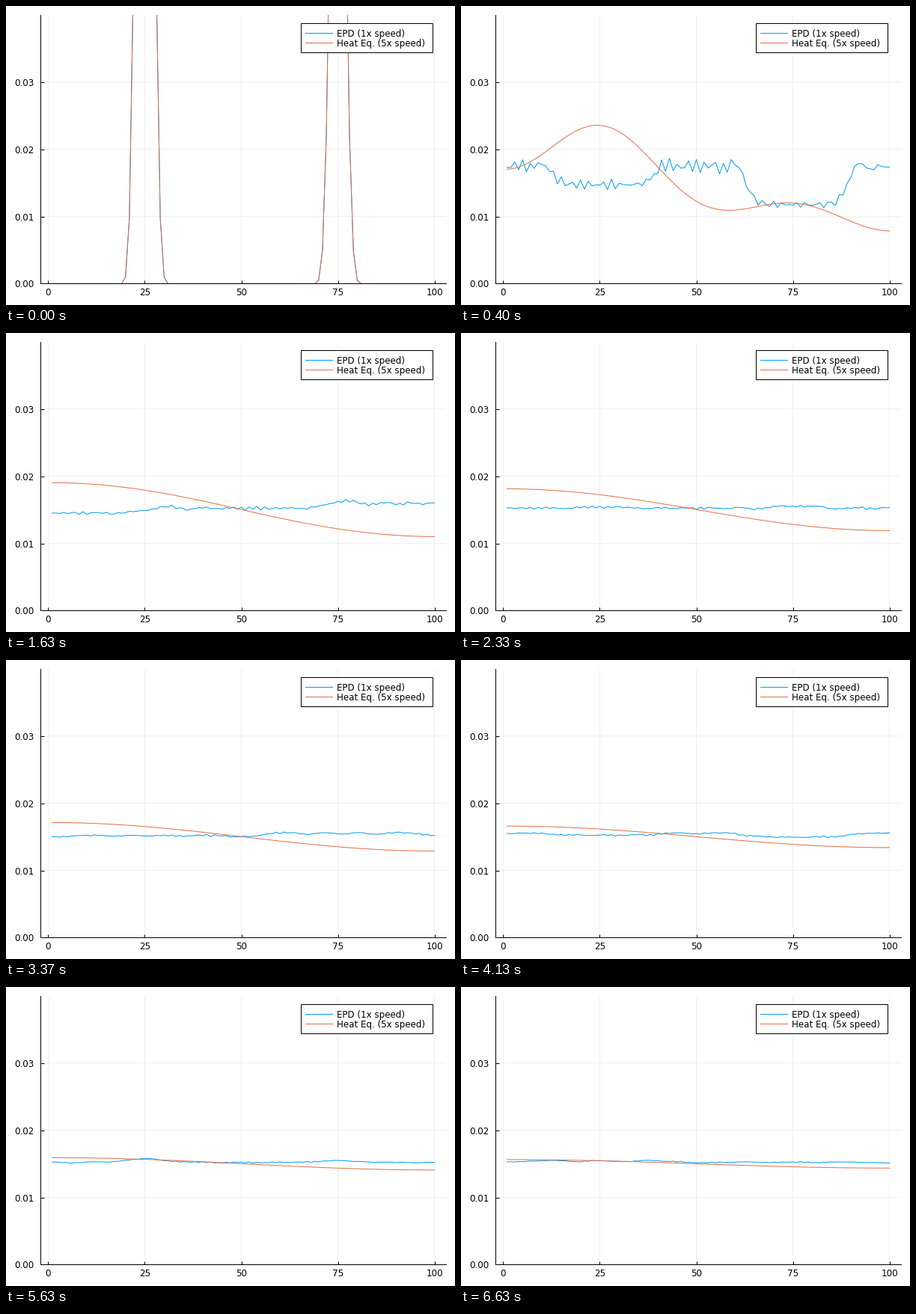
These frames come from a looping animation (600x400 px, 6.66 s). A matplotlib script:

```python
import numpy as np
import matplotlib.pyplot as plt
from matplotlib.animation import FuncAnimation
from matplotlib.lines import Line2D
from matplotlib.patches import Rectangle

W, H, DPI = 600, 400, 100
TICK_MS, LOOP_MS = 20, 6660
POSES = 200         # simulation states per loop
PX = 72 / DPI
BLUE, RED = "#009afa", "#e36f47"
STEPS = 10          # wave steps per state; diffusion runs five times faster
COURANT = 0.7
SMOOTH = 5          # smoothing passes on the starting peaks

plt.rcParams["font.family"] = "DejaVu Sans"
plt.rcParams["font.size"] = 11.9 * PX

x = np.arange(1, 101)
start = np.where(x == 25, 1.0, 0) + np.where(x == 75, 0.5, 0)


def laplacian(u):
    p = np.pad(u, 1, mode="edge")
    return p[2:] - 2 * u + p[:-2]


def run_heat():
    u = start.copy()
    for _ in range(SMOOTH):
        u += laplacian(u) / 4
    states = [u.copy()]
    for _ in range(POSES - 1):
        for _ in range(5 * STEPS):
            u += laplacian(u) / 4
        states.append(u.copy())
    return states


def run_wave():
    """u_tt + (2/t) u_t = u_xx on the inner cells; end points copy neighbours."""
    u, speed = start[1:-1].copy(), 0
    states = []
    for n in range(1, STEPS * (POSES - 1) + 1):
        speed = (1 - 2 / n) * speed + COURANT**2 * laplacian(u)
        u = u + speed
        if n % STEPS == 0:
            states.append(np.pad(u, 1, mode="edge"))
    return states


heat = run_heat()
wave = [heat[0]] + run_wave()

fig = plt.figure(figsize=(W / DPI, H / DPI), dpi=DPI, facecolor="white")
left, right, top, bottom = 46.3, 587.9, 11.7, 371.45
ax = fig.add_axes([left / W, 1 - bottom / H, (right - left) / W, (bottom - top) / H])
ax.set_xlim(-1.97, 102.97)
ax.set_ylim(0, 0.04)
ax.set_xticks([0, 25, 50, 75, 100])
ax.set_yticks([0, 0.01, 0.02, 0.03])
ax.yaxis.set_major_formatter("{x:.2f}")
ax.tick_params(direction="in", length=4.5 * PX, width=PX)
ax.tick_params(axis="x", pad=3.8)
ax.tick_params(axis="y", pad=6.6)
ax.grid(color="black", alpha=0.06, linewidth=PX, snap=False)
ax.set_axisbelow(True)
for side in ("top", "right"):
    ax.spines[side].set_visible(False)
for side in ("left", "bottom"):
    ax.spines[side].set_linewidth(PX)

wave_line, = ax.plot([], [], color=BLUE, lw=PX, zorder=3)
heat_line, = ax.plot([], [], color=RED, lw=PX, zorder=4)

# Legend, placed in pixels
over = fig.add_axes([0, 0, 1, 1], zorder=5)
over.set_xlim(0, W)
over.set_ylim(H, 0)
over.axis("off")
over.add_patch(Rectangle((394.4, 23.4), 176, 39, fc="white", ec="black", lw=PX))
for y, color, label in ((36.4, BLUE, "EPD (1x speed)"),
                        (49.4, RED, "Heat Eq. (5x speed)")):
    over.add_line(Line2D([400, 436.4], [y, y], color=color, lw=PX))
    over.text(441.6, y + 4.6, label, va="baseline")


def draw(tick):
    pose = int((tick + 0.75) * TICK_MS * POSES / LOOP_MS)
    wave_line.set_data(x, wave[pose])
    heat_line.set_data(x, heat[pose])
    return wave_line, heat_line


anim = FuncAnimation(fig, draw, frames=LOOP_MS // TICK_MS, interval=TICK_MS,
                     repeat=True, repeat_delay=0)
plt.show()
```
